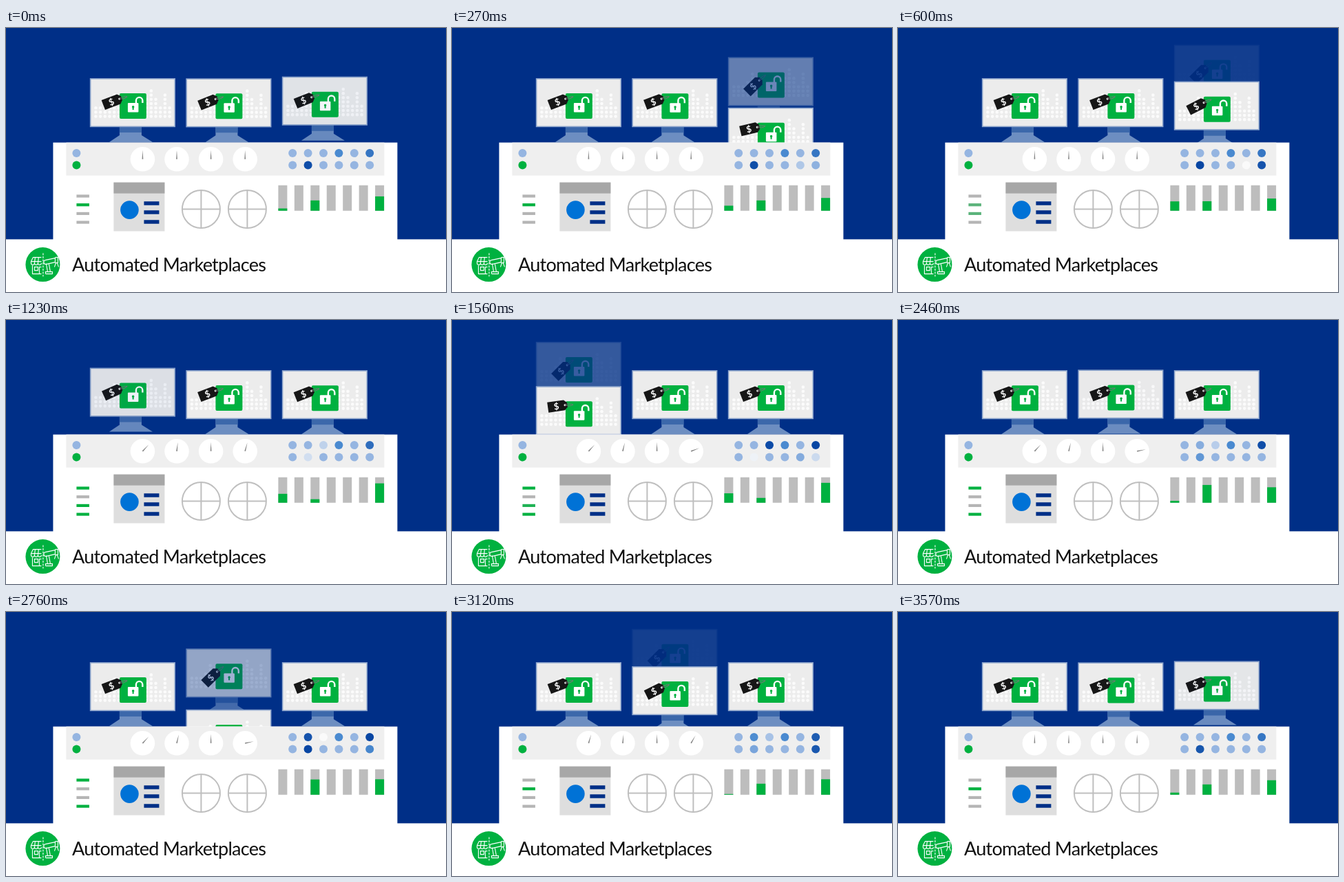
Animation of 639x384 px, one loop 3.6 s. Source, as an HTML page:

```html
<!DOCTYPE html>
<html lang="en">
<head>
<meta charset="utf-8">
<title>Automated Marketplaces</title>
<style>
  html, body { margin: 0; width: 100%; height: 100%; overflow: hidden; background: #fff; }
  svg { display: block; width: 639px; height: 384px; }
  .title { font: 27px Lato, "Open Sans", sans-serif; letter-spacing: -.75px; }
  .cash { font: bold 13px Lato, sans-serif; }
</style>
</head>
<body>
<svg viewBox="-.4 -.6 639 384">
  <defs>
    <g id="monitor">
      <path d="M43 70H75V83L91 93H28L43 83Z" fill="#6d8ec1"/>
      <path d="M43 70H75V79H43Z" fill="#3c68ab"/>
      <rect x=".7" y=".7" width="122.6" height="69.6" fill="#ececec" stroke="#8ba3cb" stroke-width="1.6"/>
      <g id="dots" fill="#fbfbfb"></g>
      <rect x="43" y="22" width="39" height="37" rx="2" fill="#00b140"/>
      <rect x="55" y="36" width="15.5" height="13.5" rx="1" fill="#fff"/>
      <path d="M67 37V32.5a4.7 4.7 0 0 1 9.4 0V36" fill="none" stroke="#fff" stroke-width="2.4"/>
      <path d="M62.7 40a1.7 1.7 0 0 1 1 3.1V46H61.7V43.1a1.7 1.7 0 0 1 1 -3.1Z" fill="#00b140"/>
    </g>
    <!-- Price tag, hanging from its string at 0,0 -->
    <g id="tag">
      <path d="M-36 -7.5H-12L-7.500 -3V3L-12 7.500H-36Z" fill="#161616"/>
      <text class="cash" x="-23.500" y="4.700" text-anchor="middle" fill="#fff">$</text>
      <circle cx="-11" r="1.500" fill="#eee"/>
      <path d="M-11 0C-8 -2 -4 -1 1 1M-11 0C-7 2 -3 3 1 1" fill="none" stroke="#777" stroke-width=".9"/>
    </g>
  </defs>
  <rect x="-1" y="-1" width="641" height="308" fill="#002f87"/>
  <rect x="-1" y="307" width="641" height="79" fill="#fff"/>
  <g id="screens"></g>
  <rect x="68" y="166" width="500" height="142" fill="#fff"/>
  <rect x="87" y="166" width="462" height="48" fill="#efefef"/>
  <circle cx="102" cy="181.500" r="6" fill="#95b5e1"/>
  <circle cx="102" cy="199" r="6" fill="#00b140"/>
  <g id="panel"></g>
  <rect x="156" y="224" width="74" height="71" fill="#dedede"/>
  <rect x="156" y="224" width="74" height="16" fill="#a7a7a7"/>
  <circle cx="179" cy="264" r="13.300" fill="#0072d6"/>
  <path d="M200 254.500H222M200 267.500H222M200 281.500H222" stroke="#002f87" stroke-width="5.500"/>
  <g id="wheels" fill="none" stroke="#bfbfbf" stroke-width="2"></g>
  <circle cx="53" cy="343.500" r="25" fill="#00b140"/>
  <g fill="none" stroke="#fff" stroke-width="1.100" stroke-linejoin="round">
    <path d="M39 333H51M39 333L36 339V341.500a2.500 2.500 0 0 0 5 0a2.500 2.500 0 0 0 5 0a2.500 2.500 0 0 0 5 0M36 339H51M42 333L41 341M47 333L46 341M38 345V357H51M41 347H46V352H41ZM48 357V347H51"/>
    <path d="M53.500 327V361" stroke-dasharray="3 1.500"/>
    <path d="M57 357H67V354H57V357M60 354L58 342M64 354L62 343M57 337a3 3 0 0 0 1 6L71 340V334L57 337M71 333H75V341H71M72 341L70 347M74 341L76 347"/>
  </g>
  <text class="title" x="95.700" y="353.500" fill="#111">Automated Marketplaces</text>
</svg>
<script>
const LOOP = 3600;
const $ = id => document.getElementById(id);

function set(el, attrs) {
  for (const k in attrs) el.setAttribute(k, attrs[k]);
  return el;
}
function add(parent, tag, attrs = {}) {
  const el = set(document.createElementNS("http://www.w3.org/2000/svg", tag), attrs);
  parent.append(el);
  return el;
}

const clamp = (v, lo, hi) => Math.min(hi, Math.max(lo, v));
const mix = (a, b, u) => `rgb(${a.map((v, i) => Math.round(v + (b[i] - v) * u))})`;
const sigmoid = x => 1 / (1 + Math.exp(-x));

function ramp(t, start, length) {
  const u = clamp((t - start) / length, 0, 1);
  return u * u * (3 - 2 * u);
}

// Soft bump around a moment of the loop
function bump(t, at, width) {
  const d = Math.abs(t - at), near = Math.min(d, LOOP - d);
  return near < width ? Math.cos(near / width * Math.PI / 2) ** 2 : 0;
}

// A resting level with rises and dips at the given moments
function level(t, { base, up, down, peaks = [], dips = [], width }) {
  const sum = list => list.reduce((s, at) => s + bump(t, at, width), 0);
  return base + up * sum(peaks) - down * sum(dips);
}

// Equaliser dots: two hills and a spike on a low floor
for (let col = 0; col < 17; col++) {
  const rows = Math.round(2.600 + 3 * bump(col, 4.300, 3) + 4.400 * bump(col, 12, 2) + 3.500 * bump(col, 15, 1) + bump(col, 8.500, 4));
  for (let r = 0; r < rows; r++)
    add($("dots"), "circle", { cx: 8.500 + col * 6.700, cy: 55.500 - r * 6.200, r: 2.300 });
}

// The old screen lifts and fades while a new one rises behind the desk
function addMonitor() {
  const el = add($("screens"), "g");
  add(el, "use", { href: "#monitor" });
  return { el, tag: add(el, "use", { href: "#tag" }) };
}
function place({ el, tag }, x, y, angle, opacity) {
  set(el, { transform: `translate(${x} ${y})`, opacity });
  set(tag, { transform: `translate(53 26) rotate(${angle})` });
}
const LEAD = 250, GONE = 820, TOP = 72.500, HANG = -21;
const screens = [1200, 2560, 0].map((start, i) => ({
  x: 121.500 + i * 139.500, start, old: addMonitor(), next: addMonitor()
}));
function drawScreen({ x, start, old, next }, t) {
  const p = (t - start + LEAD + LOOP) % LOOP - LEAD;
  const lift = sigmoid((p - 230) / 78);
  const drop = Math.min(1, Math.exp((145 - p) / 147));
  const swing = 13 * Math.exp((360 - p) / 300) * Math.cos((p - 360) / 510 * 2 * Math.PI);
  place(old, x, TOP - 49 * lift, HANG - 24 * ramp(p, -30, 260), p < GONE ? 1 - .930 * lift : 0);
  place(next, x, TOP + 100 * drop, HANG + (p > 0 ? swing : 0), 1);
}

// Gauges: swing out one after another, return together
const gauges = [[43, 600], [13, 900], [0, 0], [79, 1050]].map(([angle, start], i) => {
  const x = 198 + i * 49.600;
  add($("panel"), "circle", { cx: x, cy: 190.200, r: 17.800, fill: "#fff" });
  return { x, angle, start, el: add($("panel"), "path", { d: "M-.9 0L0 -13L.9 0Z", fill: "#858585" }) };
});

// Lamps: 0 white, 1 light, 2 medium, 3 dark
const SHADES = [[250, 250, 250], [149, 181, 225], [74, 138, 208], [8, 70, 163]];
function shade(v) {
  const i = Math.min(2, Math.floor(v));
  return mix(SHADES[i], SHADES[i + 1], v - i);
}
const BLINK = {
  1: { peaks: [2860] },
  2: { peaks: [1560], dips: [1150, 2760] },
  3: { base: 2 },
  5: { base: 2.300, peaks: [1650, 2760], dips: [2070] },
  7: { peaks: [2760, 80, 600], dips: [1450] },
  10: { peaks: [1950], dips: [600] },
  11: { peaks: [700, 3000], dips: [1800] }
};
const lamps = [...Array(12).keys()].map(i => ({
  el: add($("panel"), "circle", { cx: 415.800 + i % 6 * 22.400, cy: i < 6 ? 181.500 : 199, r: 6 }),
  blink: { base: 1, up: 2, down: 1, width: 500, ...BLINK[i] }
}));

const METERS = {
  0: { base: 3, up: 12, down: 3, peaks: [800, 1800], dips: [2760] },
  2: { base: 15, up: 11, down: 10, peaks: [2400], dips: [1300] },
  6: { base: 22.500, up: 7, down: 5, peaks: [1400], dips: [550] }
};
const meters = [];
for (let i = 0; i < 7; i++) {
  const x = 395 + i * 23.450;
  add($("panel"), "rect", { x, y: 228.200, width: 13, height: 37, fill: "#bdbdbd" });
  if (METERS[i]) meters.push({
    el: add($("panel"), "rect", { x, width: 13, fill: "#00b140" }),
    wave: { width: 900, ...METERS[i] }
  });
}

// Status lines: green between two moments, the second one the other way round
const lines = [[650, 2800], [500, 2800], [500, 1480], [650, 2800]].map(([on, off], i) => ({
  on, off, inverse: i === 1,
  el: add($("panel"), "rect", { x: 102, y: 241.800 + i * 12.700, width: 18.500, height: 4.200 })
}));

for (const x of [283, 350]) {
  add($("wheels"), "circle", { cx: x, cy: 263, r: 27.500 });
  add($("wheels"), "path", { d: `M${x - 27.500} 263h55M${x} 235.500v55` });
}

function draw(t) {
  screens.forEach(s => drawScreen(s, t));
  gauges.forEach(({ el, x, angle, start }) => {
    const turn = angle * (ramp(t, start, 650) - ramp(t, 2800, 550));
    set(el, { transform: `translate(${x} 190.200) rotate(${turn})` });
  });
  lamps.forEach(({ el, blink }) => set(el, { fill: shade(clamp(level(t, blink), 0, 3)) }));
  meters.forEach(({ el, wave }) => {
    const height = clamp(level(t, wave), 0, 37);
    set(el, { y: 265.200 - height, height });
  });
  lines.forEach(({ el, on, off, inverse }) => {
    const lit = ramp(t, on, 200) - ramp(t, off, 300);
    set(el, { fill: mix([181, 181, 181], [0, 177, 64], inverse ? 1 - lit : lit) });
  });
}

let origin;
function tick(now) {
  origin ??= now;
  draw((now - origin) % LOOP);
  requestAnimationFrame(tick);
}
draw(0);
requestAnimationFrame(tick);
</script>
</body>
</html>
```
